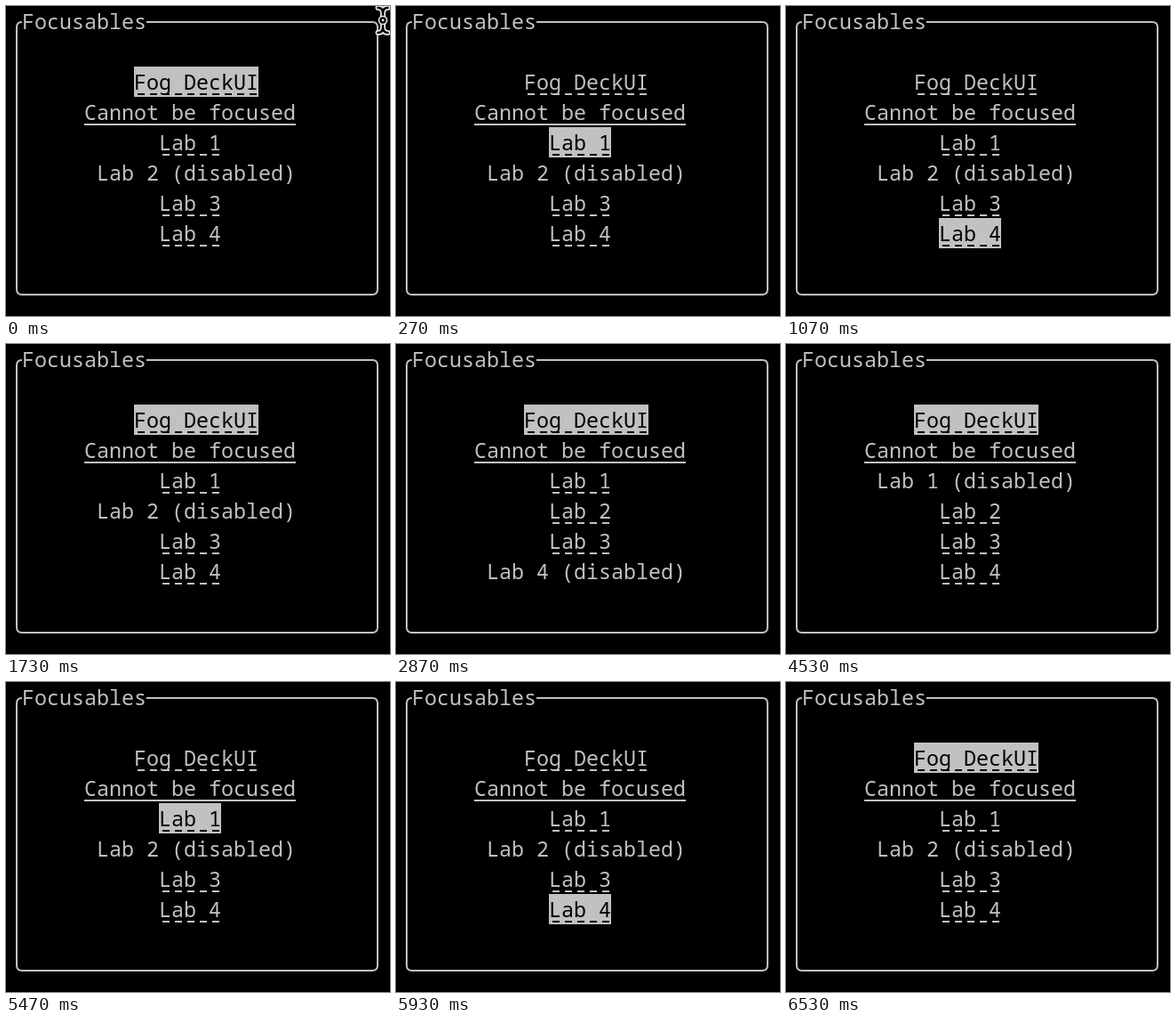
Recreate the animation shown at these times as an HTML page. Size 432 by 348 pixels, loop 7.74 s.

```html
<!DOCTYPE html>
<html lang="en">
<head>
<meta charset="utf-8">
<title>Focusables</title>
<style>
  html, body { margin: 0; width: 100%; height: 100%; overflow: hidden; background: #000; }
  svg { display: block; width: 432px; height: 348px; }
  text {
    font: 23.333px "Noto Sans Mono", "DejaVu Sans Mono", monospace;
    fill: #c1c1c1;
    white-space: pre;
  }
  .line { fill: none; stroke: #c1c1c1; stroke-width: 2; }
  .dashed { stroke-dasharray: 8 6; }
  .fill { fill: #c1c1c1; visibility: hidden; }
  .focused .fill { visibility: visible; }
  .focused text { fill: #000; }
  .focused .line { stroke: #000; }
</style>
</head>
<body>
<svg viewBox="0 0 432 348">
  <defs>
    <path id="beam" d="M418.500 2Q424 2 424 8V24Q424 30 418.500 30M429.500 2Q424 2 424 8M424 24Q424 30 429.500 30"/>
  </defs>
  <rect width="432" height="348" fill="#000"/>
  <path class="line" d="M158 18H412Q418 18 418 24V318Q418 324 412 324H18Q12 324 12 318V24Q12 18 18 18"/>
  <text x="18" y="26">Focusables</text>
  <g id="rows"></g>
  <g id="pointer" fill="none" stroke-linecap="round" stroke-linejoin="round">
    <use href="#beam" stroke="#e8e8e8" stroke-width="6"/>
    <use href="#beam" stroke="#000" stroke-width="2.500"/>
    <circle cx="424" cy="16" r="4.500" fill="#000" stroke="#e8e8e8" stroke-width="1.600"/>
    <circle cx="424" cy="16" r="1.400" fill="#e8e8e8"/>
  </g>
</svg>
<script>
const LOOP = 7740, CELL = 14, ROW = 34, CENTER = 207, LEFT = 4, TOP = 68;
const POINTER_END = 70;
const NS = 'http://www.w3.org/2000/svg';

// [start ms, focused row, disabled row]; rows 2 to 5 are the labs
const steps = [
  [0, 0, 3], [270, 2, 3], [670, 4, 3], [1070, 5, 3], [1730, 0, 3],
  [2200, 0, 4], [2870, 0, 5], [3270, 2, 5], [3470, 3, 5], [3600, 4, 5],
  [3930, 0, 5], [4530, 0, 2], [5200, 0, 3], [5470, 2, 3], [5670, 4, 3],
  [5930, 5, 3], [6530, 0, 3]
];
const labels = ['Fog DeckUI', 'Cannot be focused', 'Lab 1', 'Lab 2', 'Lab 3', 'Lab 4'];

function add(parent, tag, attrs) {
  const el = document.createElementNS(NS, tag);
  for (const key in attrs) el.setAttribute(key, attrs[key]);
  return parent.appendChild(el);
}

const rows = labels.map((label, i) => {
  const group = add(document.getElementById('rows'), 'g', {});
  const y = TOP + i * ROW;
  const fill = add(group, 'rect', { class: 'fill', y, height: ROW });
  const text = add(group, 'text', { y: y + 26 });
  const line = add(group, 'path', { class: i === 1 ? 'line' : 'line dashed' });
  return { group, fill, text, line, label, y };
});

function drawRow(row, i, focused, disabled) {
  const label = row.label + (disabled ? ' (disabled)' : '');
  const width = label.length * CELL;
  // Centred text snaps right to whole cells
  const x = LEFT + Math.ceil((CENTER - LEFT - width / 2) / CELL) * CELL;
  const inset = i === 1 ? 0 : 4;
  row.text.textContent = label;
  row.text.setAttribute('x', x);
  row.fill.setAttribute('x', x);
  row.fill.setAttribute('width', width);
  row.line.setAttribute('d', `M${x + inset} ${row.y + 31}H${x + width}`);
  row.line.style.visibility = disabled ? 'hidden' : 'visible';
  row.group.setAttribute('class', focused ? 'focused' : '');
}

const pointer = document.getElementById('pointer');
let shown = null;

function render(now) {
  const t = now % LOOP;
  const step = steps.findLast(s => s[0] <= t);
  pointer.style.visibility = t < POINTER_END ? 'visible' : 'hidden';
  if (step !== shown) {
    shown = step;
    rows.forEach((row, i) => drawRow(row, i, i === step[1], i === step[2]));
  }
}

const start = performance.now();
function tick() {
  render(performance.now() - start);
  requestAnimationFrame(tick);
}
tick();
</script>
</body>
</html>
```
